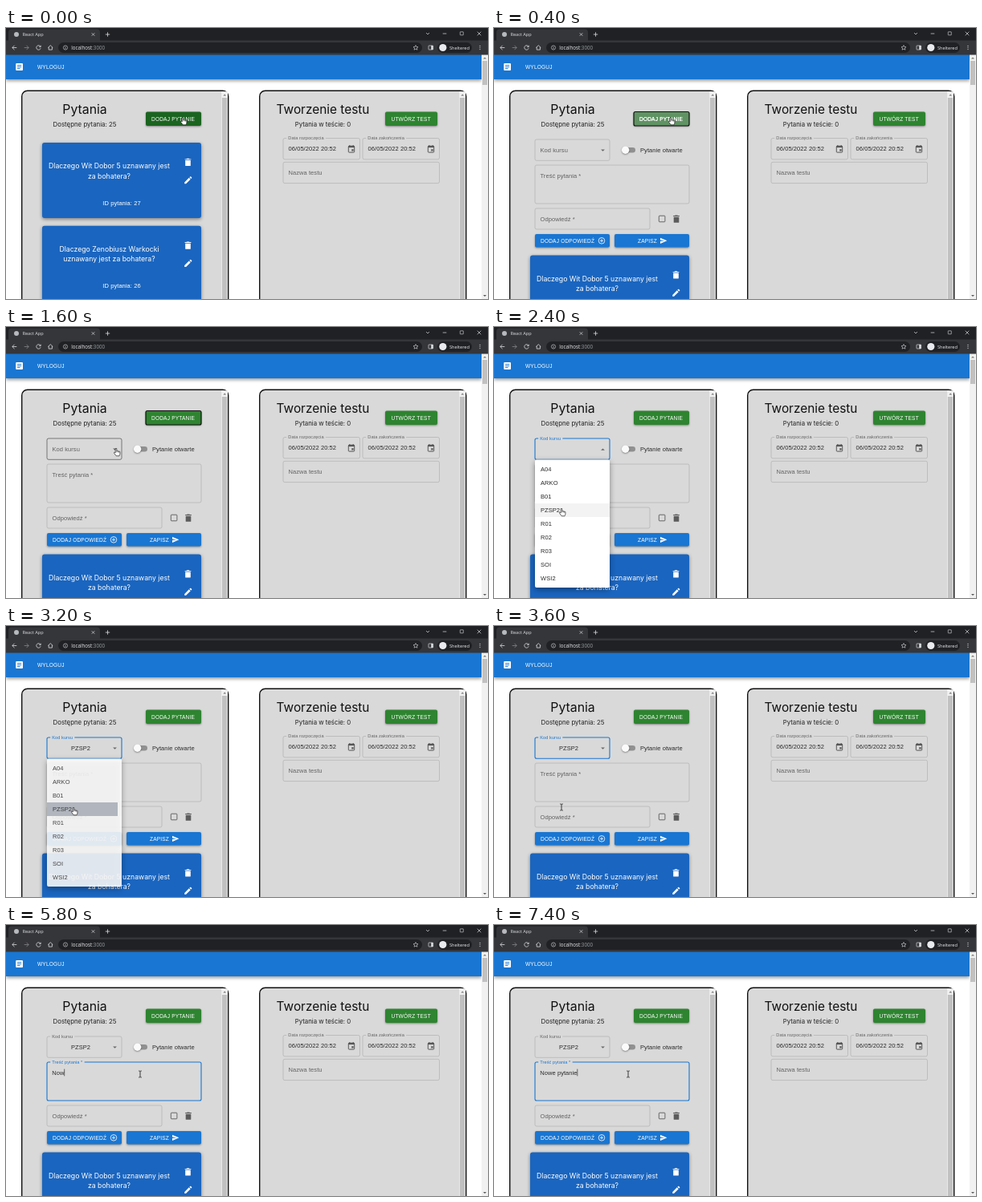
Recreate the animation shown at these times as an HTML page with a canvas. Size 600x338 px, loop 8000 ms.

```html
<!DOCTYPE html>
<html lang="pl">
<head>
<meta charset="utf-8">
<title>React App</title>
<style>
html, body { margin: 0; width: 100%; height: 100%; overflow: hidden; background: #fff; }
canvas { display: block; width: 600px; height: 338px; }
</style>
</head>
<body>
<canvas id="stage"></canvas>
<script>
const W = 600, H = 338, LOOP = 8000, STEP = 200;
const canvas = document.getElementById('stage');
const ratio = window.devicePixelRatio || 1;
canvas.width = W * ratio;
canvas.height = H * ratio;
const c = canvas.getContext('2d');

const UI = '"Liberation Sans", Arial, sans-serif';
const HEAD = 'Inter, sans-serif';
const CHROME = '"Open Sans", sans-serif';
const BLUE = '#1976d2', GREEN = '#2e8430', PANEL = '#d9d9d9';
const INK = '#2b2b2b', MUTED = '#626262', LINE = '#aaaaaa';
const CODES = ['A04', 'ARKO', 'B01', 'PZSP2', 'R01', 'R02', 'R03', 'SOI', 'WSI2'];
const TYPED = 'Nowe pytanie';

function text(str, x, y, size, color, { font = UI, align = 'left', weight = 400, gap = 0.07 } = {}) {
  c.font = `${weight} ${size}px ${font}`;
  c.letterSpacing = gap + 'px';
  c.textAlign = align;
  c.fillStyle = color;
  c.fillText(str, x, y);
}

function rect(x, y, w, h, color) {
  c.fillStyle = color;
  c.fillRect(x, y, w, h);
}

function round(x, y, w, h, r, fill, stroke, width = 0.6) {
  c.beginPath();
  c.roundRect(x, y, w, h, r);
  if (fill) { c.fillStyle = fill; c.fill(); }
  if (stroke) { c.strokeStyle = stroke; c.lineWidth = width; c.stroke(); }
}

function disc(x, y, r, fill, stroke, width = 0.8) {
  c.beginPath();
  c.arc(x, y, r, 0, Math.PI * 2);
  if (fill) { c.fillStyle = fill; c.fill(); }
  if (stroke) { c.strokeStyle = stroke; c.lineWidth = width; c.stroke(); }
}

function path(d, x, y, fill, stroke, width = 1) {
  const p = new Path2D(d);
  c.save();
  c.translate(x, y);
  if (fill) { c.fillStyle = fill; c.fill(p); }
  if (stroke) { c.strokeStyle = stroke; c.lineWidth = width; c.lineJoin = 'round'; c.stroke(p); }
  c.restore();
}

function shadow(blur, dy, alpha, draw) {
  c.save();
  c.shadowColor = `rgba(0,0,0,${alpha})`;
  c.shadowBlur = blur * ratio;
  c.shadowOffsetY = dy * ratio;
  draw();
  c.restore();
}

const trash = (x, y, color) =>
  path('M-3.3 -2.5H3.3V4Q3.3 4.6 2.7 4.6H-2.7Q-3.3 4.6 -3.3 4ZM-3.9 -4.1H-2L-1.3 -4.7H1.3L2 -4.1H3.9V-3.2H-3.9Z', x, y, color);

const pencil = (x, y, color) =>
  path('M-4.3 4.3V2.4L1.3 -3.2L3.2 -1.3L-2.4 4.3ZM1.9 -3.8L2.8 -4.7Q3.2 -5 3.6 -4.7L4.7 -3.6Q5 -3.2 4.7 -2.8L3.8 -1.9Z', x, y, color);

const triangle = (x, y, w, h, color) => path(`M${-w} ${-h / 2}H${w}L0 ${h / 2}Z`, x, y, color);

function calendar(x, y) {
  round(x - 3.7, y - 3.6, 7.4, 7.9, 0.8, null, '#555', 1);
  rect(x - 3.7, y - 3.7, 7.4, 2, '#555');
  rect(x - 2.7, y - 4.8, 1, 1.5, '#555');
  rect(x + 1.7, y - 4.8, 1, 1.5, '#555');
  rect(x + 0.3, y + 0.4, 2.3, 2.3, '#555');
}

function button(label, x, y, w, h, color, textX) {
  shadow(2.5, 1, 0.4, () => round(x, y, w, h, 2, color));
  text(label, textX, y + h / 2 + 2.4, 6.56, '#fff', { gap: 0.187 });
}

function field(x, y, w, h, label, { floating, focus, hover, value } = {}) {
  const edge = focus ? BLUE : hover ? '#333' : LINE;
  round(x, y, w, h, 2, null, edge, focus ? 1.1 : 0.6);
  if (!floating) return text(label, x + 6.5, y + 15.8, 7.5, MUTED);
  c.font = `5.63px ${UI}`;
  c.letterSpacing = '0.05px';
  rect(x + 4.2, y - 1, c.measureText(label).width + 4.4, 2.2, PANEL);
  text(label, x + 6.3, y + 1.8, 5.63, focus ? BLUE : MUTED, { gap: 0.05 });
  if (value) text(value, x + 6.5, y + 15.6, 7.5, INK);
}

function browser() {
  rect(0, 0, W, 16, '#202124');
  round(3, 1.5, 114, 18, [4, 4, 0, 0], '#35363a');
  rect(0, 15.5, W, 18, '#35363a');
  disc(13, 8, 3, '#b6b9bd');
  text('React App', 20.5, 10.2, 5.6, '#dfe1e5', { font: CHROME, gap: 0 });
  const pale = '#dadce0';
  path('M-1.8 -1.8L1.8 1.8M1.8 -1.8L-1.8 1.8', 108.5, 8, null, pale, 0.7);
  path('M-2.7 0H2.7M0 -2.7V2.7', 126.5, 8, null, pale, 0.8);
  path('M-2 -1L0 1L2 -1', 525, 7, null, pale, 0.7);
  path('M-2.3 0H2.3', 546, 7, null, pale, 0.7);
  round(565.3, 4.8, 4, 4, 0.3, null, pale, 0.6);
  path('M-2.3 -2.3L2.3 2.3M2.3 -2.3L-2.3 2.3', 589, 7, null, pale, 0.7);
  path('M2.8 0H-2.6M0 -2.7L-2.7 0L0 2.7', 10.5, 24.5, null, pale, 0.8);
  path('M-2.8 0H2.6M0 -2.7L2.7 0L0 2.7', 25.5, 24.5, null, '#85878b', 0.8);
  path('M2.4 -1.3A2.7 2.7 0 1 0 2.6 0.8M2.7 -2.8V-0.9H0.8', 40.5, 24.5, null, pale, 0.8);
  path('M-3 0L0 -2.8L3 0M-2.1 -0.6V2.6H2.1V-0.6', 55.3, 24.5, null, pale, 0.8);
  round(65, 18, 453, 13, 6.5, '#202124');
  disc(74, 24.5, 2.6, null, pale, 0.6);
  rect(73.7, 24, 0.6, 1.9, pale);
  rect(73.7, 22.9, 0.6, 0.6, pale);
  text('localhost', 81.3, 26.7, 6.2, '#e8eaed', { font: CHROME, gap: 0 });
  const hostWidth = c.measureText('localhost').width;
  text(':3000', 81.3 + hostWidth, 26.7, 6.2, '#9aa0a6', { font: CHROME, gap: 0 });
  path('M0 -3L0.9 -1L3 -0.8L1.4 0.6L1.9 2.7L0 1.6L-1.9 2.7L-1.4 0.6L-3 -0.8L-0.9 -1Z', 510, 24.5, null, pale, 0.6);
  round(526, 22, 5.6, 5, 0.6, null, pale, 0.7);
  rect(529.2, 22, 2.4, 5, pale);
  round(537, 18, 43, 13, 6.5, '#202124');
  disc(543.8, 24.5, 4.6, '#e8eaed');
  text('Sheltered', 552, 26.6, 5.6, '#e8eaed', { font: CHROME, gap: 0 });
  for (let i = -1; i < 2; i++) disc(590, 24.5 + i * 2.1, 0.6, pale);
}

function appBar() {
  shadow(4, 1.5, 0.4, () => rect(0, 33, 592, 31, BLUE));
  round(12.2, 44, 8.8, 9, 1, '#fff');
  [46, 48, 50].forEach((y, i) => rect(14, y, i < 2 ? 5.2 : 3.6, 0.9, BLUE));
  text('WYLOGUJ', 39, 51.2, 6.56, '#fff', { gap: 0.187 });
  rect(592, 33, 8, 305, '#f1f1f1');
  rect(593, 41, 6, 30, '#c1c1c1');
  triangle(596, 37.5, 2, -2, '#777');
  triangle(596, 334, 2, 2, '#555');
}

function panel(x) {
  round(x, 78.3, 257, 290, 7, PANEL, '#111', 1.4);
  rect(x + 248.5, 79.2, 7.8, 259, '#f1f1f1');
  rect(x + 249.2, 87, 6.4, 251, '#c1c1c1');
  triangle(x + 252.5, 83.4, 1.8, -2, '#777');
}

function card(y, lines, id) {
  shadow(4, 1.5, 0.45, () => round(45, y, 198, 94, 3, '#1a65bf'));
  lines.forEach((line, i) =>
    text(line, 128.5, y + 32 + i * 12.6, 8.7, '#fff', { font: HEAD, align: 'center', gap: 0 }));
  text('ID pytania: ' + id, 144, y + 77.6, 7.5, '#fff', { align: 'center' });
  trash(226.5, y + 24.5, '#fff');
  pencil(226.5, y + 47, '#fff');
}

function testPanel() {
  panel(315.7);
  text('Tworzenie testu', 394.5, 107.3, 15.4, '#111', { font: HEAD, align: 'center', gap: 0 });
  text('Pytania w teście: 0', 394.5, 123, 7.8, '#222', { font: HEAD, align: 'center', gap: 0 });
  button('UTWÓRZ TEST', 472, 104.5, 65, 17.5, GREEN, 479.5);
  const date = { floating: true, value: '06/05/2022 20:52' };
  field(345, 137.5, 95.5, 26.3, 'Data rozpoczęcia', date);
  field(444, 137.5, 95.5, 26.3, 'Data zakończenia', date);
  calendar(430, 150.8);
  calendar(529, 150.8);
  field(345, 167.3, 194.5, 26.3, 'Nazwa testu');
}

function addButton(s) {
  const hovered = s < 5;
  button('DODAJ PYTANIE', 174, 104.5, 69, 17.5, hovered ? '#1b6420' : GREEN, 181);
  const glow = [0, 0.2, 0.3, 0.15][s] || 0;
  if (glow) {
    c.save();
    round(174, 104.5, 69, 17.5, 2);
    c.clip();
    disc(221, 114, s === 1 ? 30 : 70, `rgba(255,255,255,${glow})`);
    c.restore();
    text('DODAJ PYTANIE', 181, 115.65, 6.56, '#fff', { gap: 0.187 });
  }
  if (s > 0 && s < 9) round(174, 104.5, 69, 17.5, 2, null, '#111', 1.2);
}

function typedLength(s) {
  if (s < 27) return 0;
  return s < 35 ? s - 26 : Math.min(TYPED.length, s - 25);
}

function form(s) {
  const selectFocus = s >= 9 && s < 26, chosen = s >= 16, menuOpen = s >= 9 && s < 16;
  field(51, 139, 93, 26.3, 'Kod kursu', { floating: s >= 9, focus: selectFocus, hover: s >= 7 && s < 9 });
  if (chosen) text('PZSP2', 93, 154.7, 7.5, INK, { align: 'center' });
  triangle(135.5, 152.6, 2.4, menuOpen ? -2.4 : 2.4, '#666');

  round(160, 149, 16, 6.6, 3.3, '#909090');
  shadow(2, 0.8, 0.4, () => disc(163.6, 152.3, 4.7, '#fafafa'));
  text('Pytanie otwarte', 182, 155, 7.5, INK);

  const focus = s >= 26, count = typedLength(s);
  field(51, 171, 192, 48, 'Treść pytania *', { floating: focus, focus, hover: s >= 20 && s < 26 });
  if (focus) {
    const shown = TYPED.slice(0, count);
    text(shown, 57.3, 186.8, 7.5, INK);
    rect(57.3 + c.measureText(shown).width, 179.6, 0.6, 8.8, '#111');
  }

  field(51, 225, 143, 26, 'Odpowiedź *');
  round(205.3, 234.2, 7.6, 7.6, 0.8, null, '#666', 1);
  trash(227, 238.2, '#5c5c5c');
  button('DODAJ ODPOWIEDŹ', 51, 257, 93, 16.6, BLUE, 58);
  disc(134, 265.3, 3.8, null, '#fff', 0.8);
  path('M-2 0H2M0 -2V2', 134, 265.3, null, '#fff', 0.8);
  button('ZAPISZ', 150, 257, 93, 16.6, BLUE, 179);
  path('M-4 -3.6L4.4 0L-4 3.6V0.8L1.6 0L-4 -0.8Z', 211, 265.3, '#fff');
}

function menu(s) {
  const alpha = s < 9 || s > 17 ? 0 : { 9: 0.4, 16: 0.87, 17: 0.3 }[s] || 1;
  if (!alpha) return;
  c.save();
  c.globalAlpha = alpha;
  shadow(7, 2.5, 0.4, () => round(51, 165.5, 93, 159.5, 2, '#fff'));
  if (s >= 12) rect(51, 220, 93, 17, '#f3f3f3');
  if (s >= 15) rect(51, 220, s === 15 ? 62 : 88, 17, '#a7adb7');
  CODES.forEach((code, i) => text(code, 58, 180.2 + i * 16.93, 7.5, INK));
  c.restore();
}

const TRACK = [[0, 220, 111], [4, 220, 111], [6, 158, 144], [7, 137, 151],
  [10, 137, 151], [12, 84, 226], [18, 84, 226], [21, 167, 186], [40, 167, 186]];

function pointer(s) {
  const i = TRACK.findIndex(key => key[0] > s);
  const [s0, x0, y0] = TRACK[i - 1], [s1, x1, y1] = TRACK[i];
  const k = (s - s0) / (s1 - s0);
  const x = x0 + (x1 - x0) * k, y = y0 + (y1 - y0) * k;
  if (s >= 18) {
    path('M-1.8 -4H-0.5L0 -3.5L0.5 -4H1.8M0 -3.5V3.5M-1.8 4H-0.5L0 3.5L0.5 4H1.8', x, y, null, '#111', 0.8);
  } else if (s === 5 || s === 6) {
    path('M0 0V8.2L2 6.4L3.4 9.3L4.7 8.7L3.4 5.9H6Z', x, y, '#fff', '#111', 0.6);
  } else {
    path('M-0.8 0.7Q0 -0.3 0.8 0.7V3.6Q1.6 3 2.2 3.9Q3 3.3 3.6 4.2Q4.6 3.8 4.9 4.8V7.2Q4.7 8.6 4 9.8H0.2Q-0.8 8.3 -2.4 6.4Q-2.8 5.2 -1.6 5.3L-0.8 6Z',
      x, y, '#fff', '#111', 0.65);
    path('M0.8 3.6V5.3M2.2 3.9V5.4M3.6 4.2V5.6', x, y, null, '#111', 0.5);
  }
}

function questionPanel(s) {
  panel(19.7);
  text('Pytania', 98, 107.3, 15.8, '#111', { font: HEAD, align: 'center', gap: 0 });
  text('Dostępne pytania: 25', 98, 123, 7.85, '#222', { font: HEAD, align: 'center', gap: 0 });
  addButton(s);
  const open = s >= 2, top = open ? 283.5 : 143;
  if (open) form(s);
  card(top, ['Dlaczego Wit Dobor 5 uznawany jest', 'za bohatera?'], 27);
  card(top + 103.7, ['Dlaczego Zenobiusz Warkocki', 'uznawany jest za bohatera?'], 26);
  menu(s);
}

function draw(now) {
  const s = Math.floor((now % LOOP) / STEP);
  c.setTransform(ratio, 0, 0, ratio, 0, 0);
  rect(0, 0, W, H, '#fff');
  questionPanel(s);
  testPanel();
  appBar();
  browser();
  pointer(s);
}

let start;
function tick(now) {
  start ??= now;
  draw(now - start);
  requestAnimationFrame(tick);
}
draw(0);
requestAnimationFrame(tick);
</script>
</body>
</html>
```
